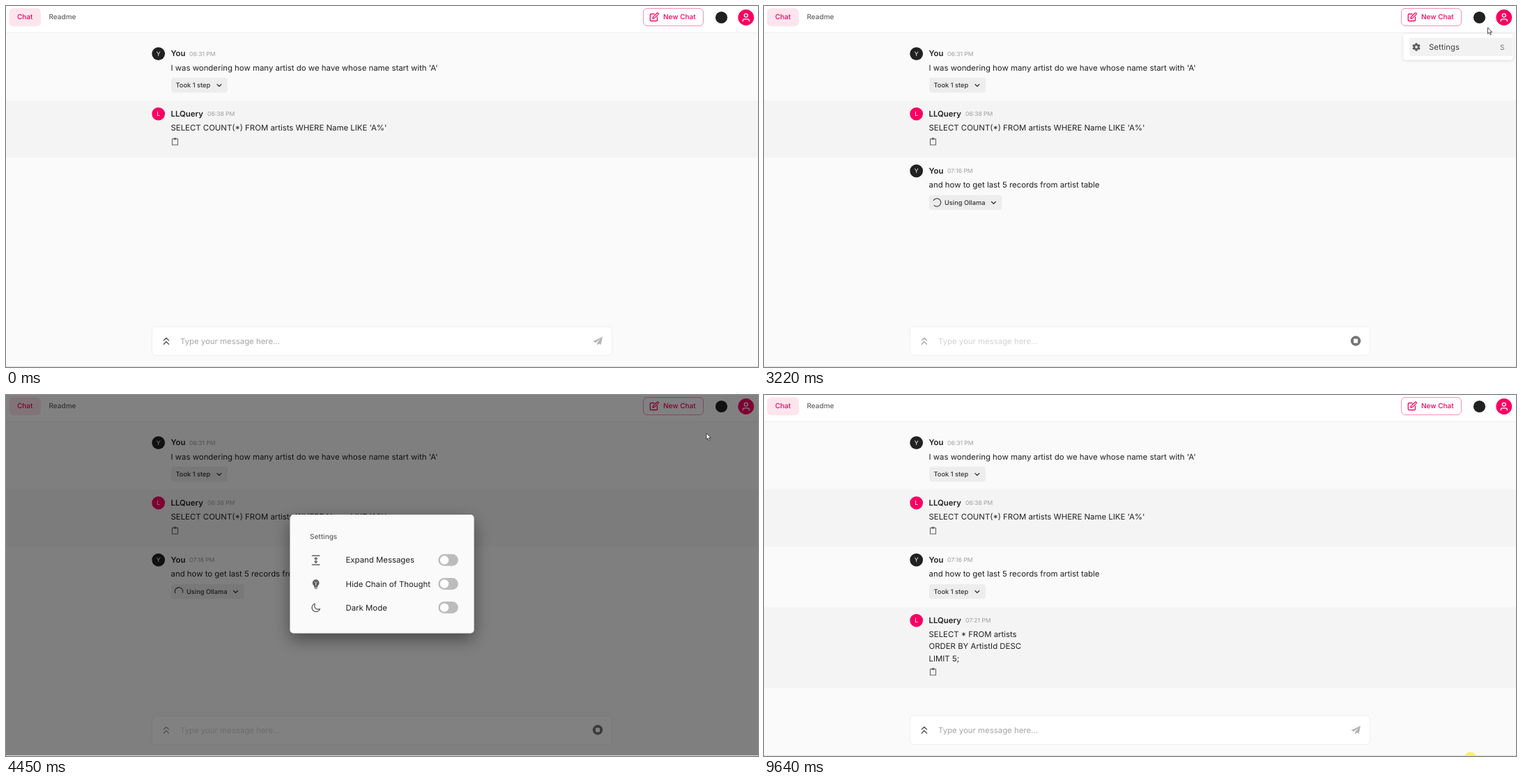
Write an HTML page that moves like this. It is 1079x519 px and loops after 9710 ms.

```html
<!DOCTYPE html>
<html lang="en">
<head>
<meta charset="utf-8">
<title>Chat</title>
<style>
html, body { margin: 0; width: 100%; height: 100%; overflow: hidden; background: #fafafa; }
svg { display: block; width: 1079px; height: 519px; font-family: Inter, "Open Sans", sans-serif; }
text { text-rendering: geometricPrecision; }
</style>
</head>
<body>
<svg id="stage" viewBox="0 0 1079 519"></svg>
<script>
const LOOP = 9710, SENT = 1174, CUT = 4920, ANSWERED = 5500;
const PINK = '#f80061', INK = '#212121';

const text = (x, y, s, size = 11.4, fill = INK, more = '') =>
  `<text x="${x}" y="${y}" font-size="${size}" fill="${fill}" ${more}>${s}</text>`;
const rect = (x, y, w, h, fill, rx = 0, more = '') =>
  `<rect x="${x}" y="${y}" width="${w}" height="${h}" rx="${rx}" fill="${fill}" ${more}/>`;
const dot = (x, y, r, fill, more = '') => `<circle cx="${x}" cy="${y}" r="${r}" fill="${fill}" ${more}/>`;
const line = (d, color, w = 1.2) =>
  `<path d="${d}" fill="none" stroke="${color}" stroke-width="${w}" stroke-linecap="round" stroke-linejoin="round"/>`;
const group = (id, body, more = '') => `<g id="${id}" ${more}>${body}</g>`;
const W5 = 'font-weight="500"', MID = 'text-anchor="middle"';

// One chat entry; y is the centre line of the author's name
function entry(y, who, time, lines) {
  const bot = who === 'LLQuery';
  return dot(218.7, y + .6, 9.4, bot ? PINK : INK) +
    text(218.7, y + 3.8, who[0], 8.8, '#fff', MID) +
    text(236.5, y + 4, who, 11.4, INK, 'font-weight="600"') +
    text(bot ? 289 : 263, y + 3.5, time, 8.55, '#9e9e9e') +
    lines.map((s, i) => text(236.5, y + 24.8 + i * 17.1, s)).join('');
}
const pill = (y, w, label, x) => rect(237, y, w, 21.5, '#ededed', 4) +
  text(x, y + 14.2, label, 9.25, '#333', W5) +
  line(`M${237 + w - 15} ${y + 9.8}l2.9 2.7 2.9-2.7`, '#333', 1.3);
const clipboard = y => line(`M238.5 ${y - 4}h8v8.8h-8z`, '#666', 1.1) + rect(240.5, y - 5.4, 4, 2.6, '#666', .8);
const band = (y, h) => rect(0, y, 1079, h, '#f4f4f4');
const gear = (x, y) => {
  let teeth = '';
  for (let a = 0; a < 360; a += 60) teeth += rect(-1.5, -5.8, 3, 3, '#616161', .5, `transform="rotate(${a})"`);
  return `<g transform="translate(${x} ${y})">${teeth}<circle r="3.1" fill="none" stroke="#616161" stroke-width="2.6"/></g>`;
};

const header = rect(0, 0, 1079, 38, '#fff') + rect(0, 37.7, 1079, 1, '#eee') +
  rect(4.5, 3.3, 45.5, 26, '#fee5ed', 6) +
  text(16, 19.4, 'Chat', 10, PINK, W5) + text(61.5, 19.4, 'Readme', 10, '#616161', W5) +
  rect(914.5, 3.5, 86, 25, '#fff', 5.5, 'stroke="#fb8fb9"') +
  line('M930 11.5h-4.4q-1.3 0-1.3 1.3v7.4q0 1.3 1.3 1.3h7.6q1.3 0 1.3-1.3v-4.2M928 18l.5-2.4 5.6-5.4q1-.7 1.8 0t0 1.9l-5.5 5.3z', PINK, 1.3) +
  text(943, 19.4, 'New Chat', 10, PINK, W5) +
  dot(1026.5, 16.5, 8.6, '#212121') + dot(1061.8, 16.5, 11.4, PINK) +
  `<circle cx="1061.8" cy="13.6" r="2.5" fill="none" stroke="#fff" stroke-width="1.3"/>` +
  line('M1057.3 21.8v-.8q0-2.2 2.2-2.2h4.6q2.2 0 2.2 2.2v.8', '#fff', 1.3);

const chat = band(136, 82) +
  entry(68, 'You', '06:31 PM', ["I was wondering how many artist do we have whose name start with 'A'"]) +
  pill(103, 81, 'Took 1 step', 243.5) +
  entry(154.5, 'LLQuery', '06:38 PM', ["SELECT COUNT(*) FROM artists WHERE Name LIKE 'A%'"]) + clipboard(195);

const question = 'and how to get last 5 records from artist table';
const spinner = `<g transform="translate(248 282.5) scale(.285)"><circle id="spin" r="20.2" fill="none" stroke="#333" stroke-width="3.8"/></g>`;

const input = rect(209.5, 461, 660, 41.3, '#fff', 5, 'stroke="#eee"') +
  group('arrows', line('M226.3 480.8l3.6-3.6 3.6 3.6M226.3 486.2l3.6-3.6 3.6 3.6', '#555', 1.4)) +
  group('hint', text(250, 485.6, 'Type your message here...', 11.4, '#a6a6a6')) +
  group('draft', text(250, 485.6, question)) +
  group('send', '<path d="M856 475.5L842.5 482l3.5 2 7-5.5-5 6.3v3.2l2-2.4 3.5 1.4z" fill="#b5b5b5"/>') +
  group('stop', dot(849, 481.5, 7.2, '#757575') + rect(846, 478.5, 6, 6, '#fff', .5));

const menu = rect(917.5, 40, 157, 37.5, '#fff', 4, 'filter="url(#soft)"') +
  `<rect id="item" x="926" y="46" width="148" height="26" fill="#000"/>` + gear(936, 59) +
  text(954, 63.1, 'Settings', 11.4, '#424242') + text(1056, 62.8, 'S', 10, '#757575');

const toggle = (y, label) => text(487.5, y + 4, label) +
  rect(620.3, y - 8.5, 28.5, 17, '#bdbdbd', 8.5) + dot(629, y, 6.2, '#fff');
const modal = rect(407.5, 172, 264, 170.5, '#fcfcfc', 5, 'filter="url(#deep)"') +
  text(436, 206.7, 'Settings', 10, '#616161', W5) +
  toggle(237.3, 'Expand Messages') + toggle(271.5, 'Hide Chain of Thought') + toggle(305.6, 'Dark Mode') +
  line('M439.3 231h10.6M439.3 244h10.6M444.6 233.8v7.4M442.7 235.5l1.9-1.9 1.9 1.9M442.7 239.5l1.9 1.9 1.9-1.9', '#616161', 1.3) +
  '<path d="M444.6 265.2a4.9 4.9 0 0 1 2.6 9v2.2h-5.2v-2.2a4.9 4.9 0 0 1 2.6-9zM442.6 277.2h4v1.2h-4z" fill="#616161"/>' +
  line('M444.6 273.5v-3.2M443 269l1.6 1.4 1.6-1.4', '#fcfcfc', .8) +
  line('M443.3 300a5.9 5.9 0 1 0 7.2 7.6q-5.8 1.6-7.6-3.2-.5-2.2.4-4.4z', '#616161', 1.3);

const tooltip = rect(815.5, 441, 67, 20, '#616161', 3) + text(849, 454.4, 'Stop Task', 8.8, '#fff', MID + ' ' + W5);

document.getElementById('stage').innerHTML = `<defs>
  <filter id="soft" x="-20%" y="-60%" width="140%" height="240%"><feDropShadow dx="0" dy="1" stdDeviation="2" flood-opacity=".14"/></filter>
  <filter id="deep" x="-30%" y="-30%" width="160%" height="170%"><feDropShadow dx="0" dy="9" stdDeviation="12" flood-opacity=".42"/></filter>
  </defs>` + rect(0, 0, 1079, 519, '#fafafa') + header + chat +
  group('ask', entry(236.5, 'You', '07:16 PM', [question])) +
  group('busy', pill(271.7, 104.5, 'Using Ollama', 259) + spinner) +
  group('reply', pill(271.7, 81, 'Took 1 step', 243.5) + band(305, 116.3) +
    entry(323.5, 'LLQuery', '07:21 PM', ['SELECT * FROM artists', 'ORDER BY ArtistId DESC', 'LIMIT 5;']) + clipboard(398)) +
  input + group('tip', tooltip) + group('menu', menu) +
  rect(0, 0, 1079, 519, '#000', 0, 'id="shade"') + group('modal', modal) +
  dot(0, 0, 15, '#fff04a', 'id="glow"') + rect(0, 518, 1079, 1, '#dedede') +
  '<path id="cursor" d="M0 0v9l2-1.9 1.6 3.3 1.5-.7-1.6-3.2h2.8z" fill="#fff" stroke="#222" stroke-width=".8"/>';

const el = {};
document.querySelectorAll('#stage [id]').forEach(n => el[n.id] = n);
const show = (n, o) => {
  n.setAttribute('opacity', +o);
  n.setAttribute('visibility', +o > 0 ? 'visible' : 'hidden');
};
const clamp = x => Math.max(0, Math.min(1, x));
const ease = x => (x = clamp(x), x * x * (3 - 2 * x));
const within = (t, a, b) => t >= a && t < b;

// Pointer trips: end time, then [time, x, y] stops
const trips = [
  [1990, [910, 838, 494], [1080, 850, 479], [1450, 850, 479], [1920, 1008, 517], [1990, 1016, 526]],
  [CUT, [2150, 1040, 526], [2650, 1062, 14], [3000, 1062, 14], [3500, 1005, 55]],
  [8230, [7490, 910, 501], [8160, 196, 360]]
];
function pointer(t) {
  for (const [end, ...stops] of trips) {
    if (!within(t, stops[0][0], end)) continue;
    const i = stops.findLastIndex(s => s[0] <= t), a = stops[i], b = stops[i + 1] || a;
    const k = b === a ? 0 : ease((t - a[0]) / (b[0] - a[0]));
    return [a[1] + (b[1] - a[1]) * k, a[2] + (b[2] - a[2]) * k];
  }
  return null;
}

function spin(t) {
  const p = ((t < CUT ? t - SENT : t - CUT + 182) / 1400) % 1;
  const up = ease(p * 2), down = ease(p * 2 - 1);
  el.spin.setAttribute('stroke-dasharray', `${1 + 99 * up} 200`);
  el.spin.setAttribute('stroke-dashoffset', -(15 * up + 110 * down));
  el.spin.setAttribute('transform', `rotate(${360 * p})`);
}

function draw(t) {
  const busy = within(t, SENT, ANSWERED), draft = within(t, 910, SENT);
  show(el.ask, t >= SENT);
  show(el.busy, busy);
  show(el.reply, t >= ANSWERED);
  show(el.arrows, busy ? .5 : 1);
  show(el.hint, draft ? 0 : busy ? .5 : 1);
  show(el.draft, draft);
  show(el.send, !busy);
  show(el.stop, busy);
  show(el.tip, ease((t - 1300) / 120) * (1 - ease((t - 1560) / 150)));
  if (busy) spin(t);

  show(el.menu, ease((t - 2900) / 200) * (1 - ease((t - 4300) / 120)));
  show(el.item, .05 + .17 * ease((t - 4200) / 90));
  const open = t < CUT ? ease((t - 4277) / 185) : 0;
  show(el.shade, open / 2);
  show(el.modal, open);

  const at = pointer(t);
  show(el.cursor, !!at);
  if (at) el.cursor.setAttribute('transform', `translate(${at})`);

  const leaving = t >= 9640;
  show(el.glow, within(t, 9290, 9360) || within(t, 9500, 9570) ? .45 : leaving ? .9 : 0);
  el.glow.setAttribute('r', leaving ? 8.3 : 15);
  el.glow.setAttribute('transform', leaving ? 'translate(1013.5 521.5)' : 'translate(1029.5 514.5)');
}

const start = performance.now();
function tick() {
  draw((performance.now() - start) % LOOP);
  requestAnimationFrame(tick);
}
draw(0);
requestAnimationFrame(tick);
</script>
</body>
</html>
```
